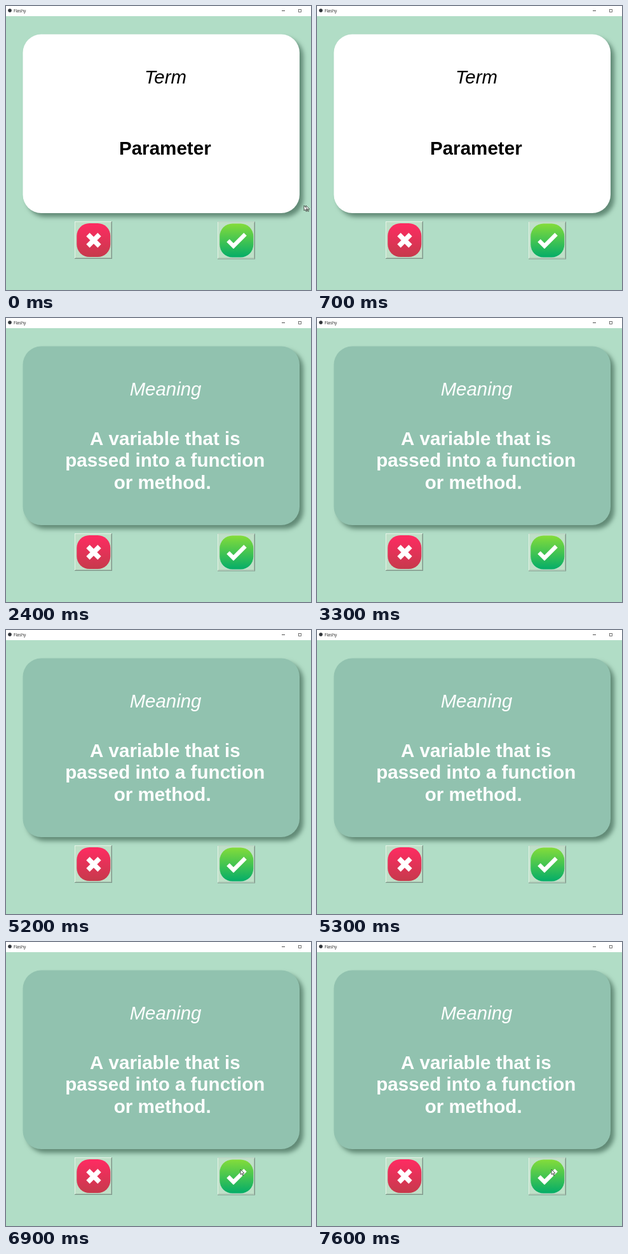
Animation of 480 by 447 pixels, one loop 8 s. Source, as an HTML page with a canvas:

```html
<!DOCTYPE html>
<html lang="en">
<head>
<meta charset="utf-8">
<title>Flashy</title>
<style>
  html, body { margin: 0; width: 100%; height: 100%; overflow: hidden; background: #b1ddc6; }
  canvas { display: block; width: 480px; height: 447px; }
</style>
</head>
<body>
<canvas id="stage" width="480" height="447"></canvas>
<script>
const ctx = document.getElementById('stage').getContext('2d');
const LOOP = 8000, STEP = 100, FLIP = 2400;
const LEAVE_END = 400, ENTER = 6100, SETTLE = 6900, REST = 7600;
const SANS = '"Liberation Sans", Arial, sans-serif';
const BG = '#b1ddc6', SHADOW = '#618a76';

const FRONT = { fill: '#ffffff', ink: '#000000', title: 'Term', lines: ['Parameter'] };
// The last line keeps its trailing space, which shifts its centre.
const BACK = {
  fill: '#91c2af', ink: '#ffffff', title: 'Meaning',
  lines: ['A variable that is', 'passed into a function', 'or method. ']
};

const CROSS = new Path2D('M-9 -9 L9 9 M9 -9 L-9 9');
const CHECK = new Path2D('M-13.5 0 L-5 8.5 L13.5 -10');
const ARROW = new Path2D('M0 0 V8 L1.9 6.4 L3.3 9.5 L4.6 8.9 L3.3 6 L5.8 5.8 Z');

function rect(x, y, w, h, color) {
  ctx.fillStyle = color;
  ctx.fillRect(x, y, w, h);
}

function rounded(x, y, w, h, r, fill) {
  ctx.beginPath();
  ctx.roundRect(x, y, w, h, r);
  ctx.fillStyle = fill;
  ctx.fill();
}

function label(text, x, y, font, color, align = 'center') {
  ctx.font = font;
  ctx.textAlign = align;
  ctx.fillStyle = color;
  ctx.fillText(text, x, y);
}

function titleBar() {
  rect(0, 0, 480, 16, '#ffffff');
  ctx.beginPath();
  ctx.arc(6, 7, 2.8, 0, Math.PI * 2);
  ctx.fillStyle = '#30343a';
  ctx.fill();
  label('Flashy', 12, 10, '6.6px "Open Sans", "Noto Sans", sans-serif', '#202020', 'left');
  rect(434, 7, 5, 1, '#505050');
  ctx.strokeStyle = '#505050';
  ctx.lineWidth = 0.8;
  ctx.strokeRect(460.5, 5.5, 4, 4);
}

function card(side) {
  ctx.save();
  ctx.shadowColor = SHADOW;
  ctx.shadowBlur = 7;
  ctx.shadowOffsetX = ctx.shadowOffsetY = 6;
  rounded(26.5, 44.5, 435.5, 281.5, 29, side.fill);
  ctx.restore();

  label(side.title, 251, 122, `italic 29.4px ${SANS}`, side.ink);
  const leading = 34.8;
  const top = 234.3 - (side.lines.length - 1) * leading / 2;
  side.lines.forEach((line, i) =>
    label(line, 250.3, top + i * leading, `bold 29.6px ${SANS}`, side.ink));
}

function button(x, y, from, to, mark, width) {
  rect(x, y, 59, 59, '#7f968a');
  rect(x, y, 58, 58, '#e4f3e6');
  rect(x + 1, y + 1, 57, 57, '#a0bba9');
  rect(x + 1, y + 1, 56, 56, '#bfe0c8');
  const fill = ctx.createLinearGradient(0, y + 3, 0, y + 56);
  fill.addColorStop(0, from);
  fill.addColorStop(1, to);
  rounded(x + 3.3, y + 3, 53, 53, 20, fill);

  ctx.save();
  ctx.translate(x + 30, y + 29.7);
  ctx.strokeStyle = '#ffffff';
  ctx.lineWidth = width;
  ctx.stroke(mark);
  ctx.restore();
}

function pointer(x, y) {
  ctx.save();
  ctx.translate(x, y);
  ctx.fillStyle = '#ffffff';
  ctx.fill(ARROW);
  ctx.strokeStyle = '#202820';
  ctx.lineWidth = 0.8;
  ctx.stroke(ARROW);
  ctx.restore();
}

const mix = (a, b, k) => a + (b - a) * k;
const easeOut = k => 1 - (1 - k) ** 3;
const progress = (t, from, to) => Math.min(1, Math.max(0, (t - from) / (to - from)));

// Drifts off to the right, later glides in, then makes one small detour.
function pointerAt(t) {
  if (t < LEAVE_END) {
    const k = t / LEAVE_END;
    return { x: mix(469, 481, k), y: mix(314, 332, k), echo: 3 };
  }
  if (t < ENTER) return null;
  const k = progress(t, ENTER, SETTLE);
  const detour = Math.sin(Math.PI * progress(t, SETTLE, REST));
  return {
    x: mix(471, 369, easeOut(k)) + 5 * detour,
    y: mix(328, 358, k) - 9 * detour,
    echo: k < 0.4 ? 8 : 0
  };
}

function drawPointer(t) {
  const p = pointerAt(t);
  if (!p) return;
  if (p.echo) pointer(p.x + p.echo, p.y);
  pointer(p.x, p.y);
}

function draw(now) {
  const t = Math.floor((now % LOOP) / STEP) * STEP;
  rect(0, 0, 480, 447, BG);
  titleBar();
  card(t < FLIP ? FRONT : BACK);
  button(108, 339, '#ff2b62', '#c63a4c', CROSS, 7.6);
  button(333, 339.5, '#84dc3a', '#04ad68', CHECK, 6.4);
  drawPointer(t);
}

const start = performance.now();
function tick() {
  draw(performance.now() - start);
  requestAnimationFrame(tick);
}
tick();
</script>
</body>
</html>
```
